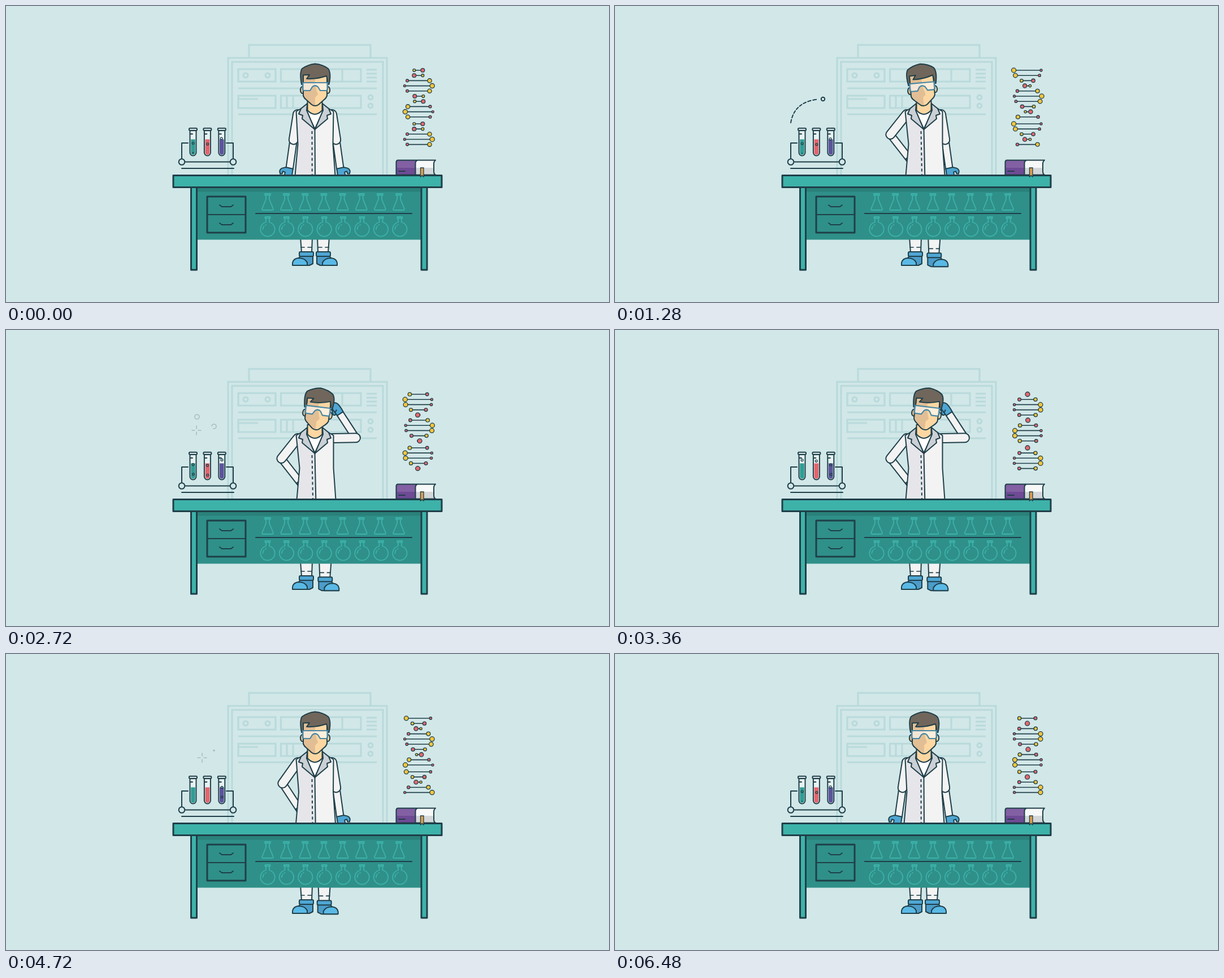
An HTML page that plays this animation: 1067x525 px, repeating every 6.52 s.

```html
<!DOCTYPE html>
<html lang="en">
<head>
<meta charset="utf-8">
<title>Scientist at the desk</title>
<style>
  html, body { margin: 0; width: 100%; height: 100%; overflow: hidden; background: #d2e7e8; }
  svg { display: block; width: 100%; height: 100%; }
  .ink { stroke: #1f3f49; stroke-width: 2; stroke-linejoin: round; stroke-linecap: round; }
  .faint { stroke: #b9dadb; stroke-width: 3.2; fill: none; }
  .none { fill: none; }
  .white { fill: #f3f3f3; }
  .glove { fill: #4fa6d3; }
  .teal { fill: #3db2a9; }
  .lapel { fill: #cbd0d5; }
  .flask { stroke: #3db2a9; stroke-width: 1.8; fill: none; stroke-linejoin: round; stroke-linecap: round; }
  .spark { stroke: #a5bfc2; stroke-width: 1.6; fill: none; }
</style>
</head>
<body>
<svg viewBox="0 0 1067 525">
  <defs>
    <g id="boot" class="ink">
      <path class="white" d="M521 410 L523 437 H541 L542 410"/>
      <path class="none" d="M522 428 H528 M534 428 H541" stroke-width="1.7"/>
      <path fill="#4c9cc9" d="M521 443 H543 V457 L537 460 H508 Z"/>
      <path fill="#5ab9e5" d="M507 460 V456 Q508 448 518 447 Q529 447 533 455 V460 Z"/>
      <rect class="glove" x="519" y="436" width="25" height="8" rx="2"/>
    </g>
    <g id="lapel" class="ink lapel">
      <path d="M533 173 L522 182 L518 191.500 L525 194 L524 200 L546.500 219 L532 185 Z"/>
    </g>
    <g id="arm">
      <g class="fore">
        <path class="ink foreLine" style="stroke-width:14.500"/>
        <path class="foreLine" stroke="#f3f3f3" stroke-width="10.500" stroke-linecap="round"/>
      </g>
    </g>
  </defs>

  <g class="faint">
    <path d="M430 92 V69 H645 V92 M393 300 V92 H674 V300 M400 300 V99 H667 V300"/>
    <path d="M411 112 H477 V134 H411 Z M486.500 112 H628 V134 H486.500 Z M595 112 V134"/>
    <path d="M411 159 H477 V181 H411 Z M486.500 159 H628 V181 H486.500 Z M497 159 V181 M508 159 V181 M411 165 H446"/>
    <path d="M638 113 H656 M638 120 H656 M638 127 H656 M638 134 H656 M411 146 H656 M411 192 H656"/>
    <circle cx="424" cy="123" r="4"/><circle cx="463" cy="123" r="4"/>
    <circle cx="645" cy="162" r="3.800"/><circle cx="645" cy="177" r="3.800"/>
  </g>

  <g class="ink">
    <path class="none" d="M311 271 V243 H322 M402 271 V243 H390 M311 276.500 H402 M311 288 H403"/>
    <circle cx="311" cy="276.500" r="5.300" fill="#d2e7e8"/><circle cx="402" cy="276.500" r="5.300" fill="#d2e7e8"/>
  </g>
  <g id="tubes"></g>
  <g id="sparks"></g>
  <g id="dna"></g>

  <use href="#boot"/>
  <g id="rightLeg"><use href="#boot" transform="translate(1093) scale(-1 1)"/></g>
  <g id="leftArm"></g>
  <g id="rightArm"></g>

  <g class="ink">
    <path id="coatRight" fill="#f3f3f3" stroke="none"/>
    <path id="coatLeft" fill="#e6e6ea" stroke="none"/>
    <path id="coatEdge" class="none"/>
    <path id="seam" class="none"/>
    <path id="stitch" class="none" stroke-dasharray="5 4.500" style="stroke-linecap:butt"/>
    <path fill="#fff" d="M530 184 L546.500 218 L563 184 Z"/>
    <path fill="#fdd7a2" d="M533.500 168 V185 Q546.500 199 559.500 185 V168 Z"/>
    <use href="#lapel"/><use href="#lapel" transform="translate(1093) scale(-1 1)"/>
  </g>

  <g id="head" class="ink">
    <ellipse cx="524.500" cy="149" rx="3.600" ry="6" fill="#e2be94"/>
    <ellipse cx="569.500" cy="149" rx="3.600" ry="6" fill="#fdd7a2"/>
    <path fill="#fdd7a2" stroke="none" d="M526 115 V159 Q527 163 531 166 L541 175 Q547 179 553 175 L563 166 Q567 163 568 159 V115 Z"/>
    <path fill="#e2be94" stroke="none" d="M526 115 V159 Q527 163 531 166 L541 175 Q544 177 547 177 V162 L552 157 L547 141 V115 Z"/>
    <path class="none" d="M526 115 V159 Q527 163 531 166 L541 175 Q547 179 553 175 L563 166 Q567 163 568 159 V115"/>
    <path fill="#70665b" d="M523 139 Q519 118 524 111 Q534 104 547 102.500 Q561 104 570 111 Q576 119 571.500 139 L569 138 Q569 130 567 124 Q550 130 532 129 L537 122 L526 122.500 V138 Z"/>
    <path fill="#fff" fill-opacity=".62" style="stroke:#4687a5;stroke-width:2.200" d="M525 136 H569 V147 Q569 150 566 150 H556 L552 143.500 Q547 139 542 143.500 L538 150 H528 Q525 150 525 147 Z"/>
  </g>

  <rect x="338" y="322" width="397" height="92.500" fill="#2f9089"/>
  <rect x="338" y="322" width="397" height="7.500" fill="#2a817a"/>
  <g class="ink" style="stroke-width:3">
    <rect class="teal" x="327.500" y="321" width="10" height="147"/>
    <rect class="teal" x="735" y="321" width="10" height="147"/>
    <rect class="teal" x="296" y="300.500" width="475" height="21"/>
    <path class="none" d="M356 338 H424 V402 H356 Z"/>
  </g>
  <path class="ink none" d="M356 370 H424 M378 353 L382 356 H398 L402 353 M378 385 L382 388 H398 L402 385 M442 368 H718"/>
  <g id="flasks" class="flask"></g>

  <g>
    <path fill="#8260a3" d="M691 274 H725 V299 H691 Z"/>
    <path fill="#6f4a95" d="M691 287 H725 V299 H691 Z"/>
    <path fill="#f7f8f8" d="M725 274 H759 L757 280 V299 H725 Z"/>
    <path fill="#d3d7da" d="M725 287 H757 V299 H725 Z"/>
    <path class="ink none" d="M760 273.500 H693 Q690.500 274 690.500 277 V299.500 H760 M728 273.500 Q724.500 275 724.500 279 V299 M760 273.500 Q756.500 276 757 282 V293 Q757 298 760 299.500 M695 293 H706"/>
    <path fill="#e0a04d" stroke="#1f3f49" stroke-width="1.300" d="M733.500 287 H739 V303 L736.200 300.500 L733.500 303 Z"/>
  </g>
</svg>
<script>
const LOOP = 6520, STEP = 40;
const $ = id => document.getElementById(id);

function add(parent, tag, attrs) {
  const el = document.createElementNS("http://www.w3.org/2000/svg", tag);
  for (const name in attrs) el.setAttribute(name, attrs[name]);
  return parent.appendChild(el);
}
const set = (el, attrs) => { for (const name in attrs) el.setAttribute(name, attrs[name]); };
const clamp = (v, lo = 0, hi = 1) => Math.min(hi, Math.max(lo, v));
const mix = (a, b, u) => a + (b - a) * u;
const ramp = (t, from, to) => clamp((t - from) / (to - from));
const ease = u => u * u * (3 - 2 * u);
const move = (t, from, to) => ease(ramp(t, from, to));
const rad = deg => deg * Math.PI / 180;

// Flasks under the desk
for (let i = 0; i < 8; i++) {
  const x = 463 + 33.15 * i, cx = 463 + 33.4 * i;
  add($("flasks"), "path", { d: `M${x - 5} 333 h10 v2.500 h-10 Z M${x - 3} 336 v7 L${x - 10} 360 q0 2 2 2 h16 q2 0 2 -2 L${x + 3} 343 v-7` });
  add($("flasks"), "path", { d: `M${cx - 4.5} 374 h9 v2.500 h-9 Z M${cx - 3} 377 v6.500 A12.700 12.700 0 1 0 ${cx + 3} 383.500 V377 M${cx - 8.5} 396 a8.500 8.500 0 0 1 2 -5.500 M${cx - 4} 388.500 l1 -.5` });
}

// Test tubes with rising bubbles
const bubbles = [];
[["#2f9d94", 0], ["#e4646c", 40], ["#5b549b", 650]].forEach(([color, shift], i) => {
  const x = 331 + 25.4 * i, g = add($("tubes"), "g", { class: "ink" });
  add(g, "path", { fill: "#e6f2f2", d: `M${x - 5.5} 221 V260 a5.500 5.500 0 0 0 11 0 V221 Z` });
  add(g, "path", { fill: color, stroke: "none", d: `M${x - 3.8} 236.500 h7.600 V260 a3.800 3.800 0 0 1 -7.600 0 Z` });
  add(g, "rect", { x: x - 7, y: 216.8, width: 14, height: 4, rx: 1.5, fill: "#e6f2f2" });
  add(g, "path", { d: `M${x - 5} 227 h4`, fill: "none" });
  [0, 440].forEach((delay, j) => bubbles.push({
    x: x + (j ? -.3 : .8), start: shift + delay,
    el: add(g, "circle", { fill: "none", style: "stroke-width:1.3" })
  }));
});

function drawBubbles(t) {
  for (const b of bubbles) {
    const age = (t - 2120 - b.start + 13000) % 1300, u = age / 820;
    set(b.el, { cx: b.x + Math.sin(u * 7) * .8, cy: 262 - 32 * u, r: 1.9 * clamp(u * 8), opacity: u < 1 ? 1 : 0 });
  }
}

// Helix
const rows = Array.from({ length: 15 }, (_, k) => {
  const y = k < 10 ? 114 + 9.2 * k : 209 + 9.15 * (k - 10), g = add($("dna"), "g", { class: "ink" });
  return {
    x: k > 4 && k < 10 ? 730.8 : 729.8,
    line: add(g, "line", { y1: y, y2: y, style: "stroke-width:1.6" }),
    yellow: add(g, "circle", { cy: y, fill: "#f2c53d", style: "stroke-width:1.3" }),
    red: add(g, "circle", { cy: y, fill: "#e6686f", style: "stroke-width:1.3" })
  };
});

function drawHelix(t) {
  rows.forEach((row, k) => {
    const c = Math.cos(rad(72 + 36 * k + 360 * t / 1640)), far = Math.abs(c);
    const x1 = row.x + 24.4 * c, x2 = row.x - 24.4 * c;
    set(row.line, { x1, x2 });
    set(row.red, { cx: x1, r: 4 - 2 * far });
    set(row.yellow, { cx: x2, r: 1.7 + 2.4 * far });
  });
}

// Dashed flight path and sparkles
const trail = add($("sparks"), "path", { class: "ink none" });
const drop = add($("sparks"), "circle", { class: "ink none" });
const rings = [[368, 171, 0], [338, 154, 70]].map(([x, y, delay]) => ({
  delay, el: add($("sparks"), "circle", { class: "spark", cx: x, cy: y, pathLength: 100, transform: `rotate(180 ${x} ${y})` })
}));
const pluses = [[347, 184, -100, 280], [337, 178, 560, 900]].map(([x, y, from, to]) => ({
  from, to, x, y, el: add($("sparks"), "path", { class: "spark" })
}));

function flight(u) {
  const v = 1 - u;
  return [311 * v * v + 636 * u * v + 368 * u * u, 207 * v * v + 332 * u * v + 165 * u * u];
}

function drawSparks(t) {
  const head = move(t, 80, 1000), tail = move(t, 1320, 1760);
  let d = "";
  for (let u = 0; u < .88; u += .115) {
    const a = Math.max(u, tail), b = Math.min(u + .07, head - .1);
    if (b > a) d += `M${flight(a)}L${flight((a + b) / 2)}L${flight(b)}`;
  }
  const [cx, cy] = flight(head);
  set(trail, { d: d || "M0 0" });
  set(drop, { cx, cy, r: 3.2 * ramp(t, 40, 160), opacity: t > 40 && t < 1800 ? 1 : 0 });

  const age = t - (t < 4400 ? 2040 : 4680);
  for (const ring of rings) {
    const a = age - ring.delay, left = 100 * (1 - ramp(a, 640, 860));
    set(ring.el, { r: 4 * ramp(a, 0, 150), "stroke-dasharray": `${left} 200`, opacity: a > 0 && left > 0 ? 1 : 0 });
  }
  for (const p of pluses) {
    const open = ramp(age, p.from, p.from + 100), close = ramp(age, p.to - 120, p.to);
    const far = 8.5 * open, near = mix(2.5, 8.5, close) * open;
    set(p.el, {
      d: [[1, 0], [-1, 0], [0, 1], [0, -1]].map(([x, y]) => `M${p.x + x * near} ${p.y + y * near}L${p.x + x * far} ${p.y + y * far}`).join(""),
      opacity: age > p.from && age < p.to ? 1 : 0
    });
  }
}

// Arms share one rig; the left one is mirrored
function makeArm(parent, mirrored, thumb) {
  const g = add(parent, "g", mirrored ? { transform: "translate(1093) scale(-1 1)" } : {});
  const limb = width => ["#1f3f49", "#f3f3f3"].map((stroke, i) =>
    add(g, "path", { stroke, "stroke-width": width - 4 * i, "stroke-linecap": "round" }));
  const fore = limb(14.5);
  const hand = add(g, "g", { class: "ink glove" });
  const rest = add(hand, "path", { d: "M-6 0 L6.500 -1 L13 1.500 Q17 4 16.500 8 L15 12 L11.500 11 L11 7 L7 7.500 V16 H-6 Z" });
  const open = add(hand, "g", {});
  if (thumb) add(open, "path", { d: "M4 3 L8 3 Q12 3 11 7 L9 12 L5 14 Z" });
  add(open, "path", { d: "M-6.500 0 Q-7.500 10 -6 17 Q-3 24 3 22 Q7 20 7 13 L6 0 Z" });
  if (thumb) add(open, "path", { class: "none", d: "M5.500 7 L2 9" });
  return { fore, upper: limb(18), hand, rest, open };
}

function poseArm(arm, upper, lower, length, onDesk) {
  const ex = 577 + length * Math.sin(rad(upper)), ey = 192 + length * Math.cos(rad(upper));
  const wx = ex + 51 * Math.sin(rad(lower)), wy = ey + 51 * Math.cos(rad(lower));
  arm.upper.forEach(el => set(el, { d: `M577 192L${ex} ${ey}` }));
  arm.fore.forEach(el => set(el, { d: `M${ex} ${ey}L${wx} ${wy}` }));
  set(arm.hand, { transform: `translate(${wx} ${wy}) rotate(${-lower})` });
  set(arm.rest, { opacity: onDesk ? 1 : 0 });
  set(arm.open, { opacity: onDesk ? 0 : 1 });
}

const leftArm = makeArm($("leftArm"), true, false), rightArm = makeArm($("rightArm"), false, true);

function drawPerson(t) {
  const lean = move(t, 440, 1000) - move(t, 4440, 5000);
  const hip = move(t, 440, 1040) - move(t, 4600, 5200);
  const back = 1 - move(t, 3480, 4160);
  const raise = move(t, 1480, 2040) * back, scratch = move(t, 2160, 2680) * back;
  const tilt = -5 * (move(t, 400, 1000) - move(t, 1440, 2000)) + 7 * (move(t, 2160, 2680) - move(t, 3480, 4120));

  set($("rightLeg"), { transform: `translate(${3.3 * lean} ${2.3 * lean})` });
  set($("head"), { transform: `rotate(${tilt} 547 182)` });
  poseArm(leftArm, mix(9, 38.5, hip), mix(8, -38, hip), 46, hip < .15);
  poseArm(rightArm, 9 + 49 * raise + 33 * scratch, 8 + 123 * raise + 82 * scratch, 46 - 2.5 * raise - 1.5 * scratch, raise < .1);

  const left = `M522 182 L513.500 187 L${516.5 + 3 * lean} 245 L${511.5 + 3 * lean} 301`;
  const right = `M571 182 L579.500 187 L${578.5 + lean} 245 L${582.5 + lean} 301`;
  const hem = 547 + 1.3 * lean;
  set($("coatLeft"), { d: `${left} H${hem} L546.500 182 Z` });
  set($("coatRight"), { d: `${right} H${hem} L546.500 182 Z` });
  set($("coatEdge"), { d: left + right });
  set($("seam"), { d: `M546.500 219L${hem} 301` });
  set($("stitch"), { d: `M541.500 222L${541.7 + 1.3 * lean} 299` });
}

function frame() {
  const t = Math.floor(performance.now() % LOOP / STEP) * STEP;
  drawBubbles(t);
  drawHelix(t);
  drawSparks(t);
  drawPerson(t);
  requestAnimationFrame(frame);
}
frame();
</script>
</body>
</html>
```
